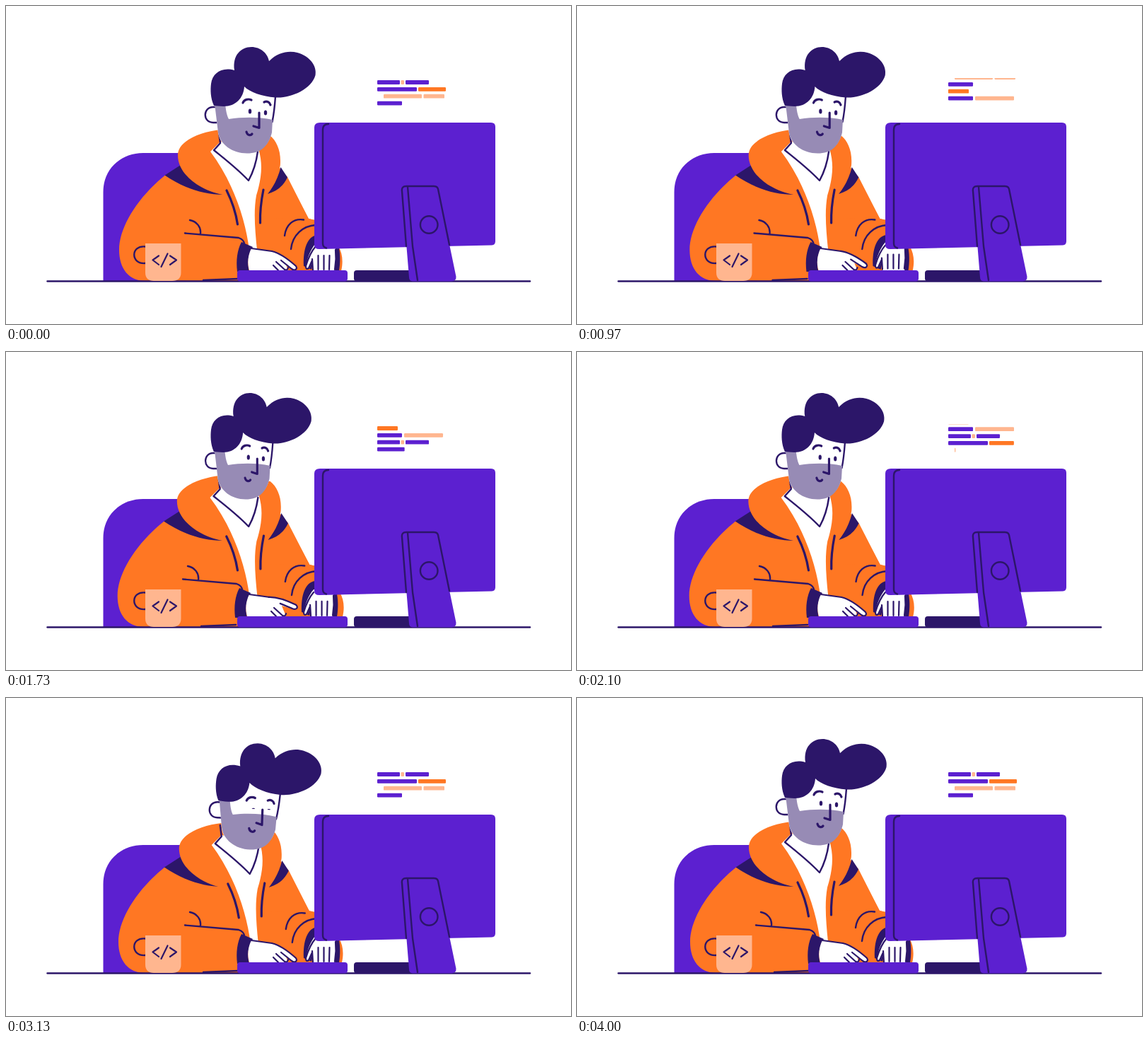
An HTML page that plays this animation: 799 by 450 pixels, repeating every 4030 ms.

```html
<!DOCTYPE html>
<html lang="en">
<head>
<meta charset="utf-8">
<title>Developer at work</title>
<style>
  html, body { margin: 0; width: 100%; height: 100%; overflow: hidden; background: #fff; }
  svg { display: block; width: 100vw; height: 100vh; }
  .purple { fill: #5c20d0; }
  .navy { fill: #2c1669; }
  .orange { fill: #ff7723; }
  .peach { fill: #ffb68f; }
  .beard { fill: #978bb5; }
  .white { fill: #fff; }
  .line { fill: none; stroke: #2c1669; stroke-width: 2.4; stroke-linecap: round; stroke-linejoin: round; }
  .bold { stroke-width: 3.2; }
  .fine { stroke-width: 2.2; }
</style>
</head>
<body>
<svg viewBox="0 0 799 450" preserveAspectRatio="none">
  <defs><clipPath id="window"><rect x="515" y="102" width="120" height="41"/></clipPath></defs>

  <path class="purple" d="M137.500 389V263C137.500 231 162 208 194 208H255V389Z"/>

  <g id="body">
    <path class="orange" d="M248 226L225 239.500C186 271 160 313 160 345C160 372 174 389 197 389H332V375H474C477 362 476 350 470 340L437 303L428 301L396 241L380 226Z"/>
    <path class="navy" d="M247 225L224.500 239.500C250 257 278 267 307 267C285 260 264 246 247 225Z"/>
  </g>

  <g id="hood">
    <path class="orange" d="M303 175C275 178 243 191 243 211C243 240 277 262 307 267L370 300L437 303L428 301L398 242L387 229C388 226 388 223 388 219C388 203 382 190 373 183Z"/>
    <path class="navy" d="M388.500 228L398 242.500C392 255 383 262 370 266C378 256 385 243 388.500 228Z"/>
    <path class="white" d="M289 206L303 192L357 202C364 225 361 245 354 268C350 290 352 316 355 345H344C339 304 322 250 289 206Z"/>
    <path class="line" d="M301 178L303 194L294 204C310 217 327 230 343 247C349 236 354 221 356 206"/>
    <path class="line bold" d="M312 261C319 275 325 292 327.500 309M364 260C361 275 359 290 359.500 307"/>
    <path class="line" d="M394 325C396 310 406 300 421 302.500M403 344C405 324 420 311 438 310"/>
  </g>

  <g id="head">
    <path class="line" style="fill:#fff" d="M298 143H293C278 143 278 165 293 165H299"/>
    <path class="white" d="M295 136L300 180C304 200 322 208 341 208C360 208 373 195 376 178L381 126Z"/>
    <path class="line" d="M381 128C380 142 379 152 376.500 164"/>
    <path class="beard" d="M295 138H310C311 148 312 154 315 160C335 157 358 157 377 161L376 179C371 199 360 208.500 341 208.500C320 208.500 303 196 300 179Z"/>
    <path class="navy" d="M294 141C289 130 289 118 290 110C292 95 305 86 323 91C320 70 332 58 347 58C360 58 370 67 372 78C385 65 400 63 412 66C430 71 440 85 437.500 98C432 118 402 131 381 129.500C362 128 345 122 337 114C336 130 325 142 308 142C302 142 297 141 294 141Z"/>
    <g id="face">
      <path id="brows" class="line bold" d="M335 137C337 132 343 131 347 133M365 136C369 134 373 136 374 140"/>
      <g id="eyes" class="navy">
        <ellipse cx="345" cy="149" rx="2.200" ry="3.500"/>
        <ellipse cx="367" cy="151" rx="2.200" ry="3.500"/>
      </g>
      <path class="line bold" d="M358 151V172.500L350 170M340 178C341 183 346 184 348 181"/>
    </g>
  </g>

  <g id="armL">
    <path class="line" d="M260 303C270 305 276 313 275 322M253 321.500L329 328Q337 331 337 337M279 388L328 386"/>
    <path class="navy" d="M333 334L349 341C342 352 341 364 344 376H327C325 360 327 345 333 334Z"/>
    <path class="white" d="M347 343L377 347L392 357L399 374H344C341 364 342 353 347 343Z"/>
    <g id="fingerL">
      <path class="white" d="M368 347L377 347C390 352 400 359 410 369C411 373 407 374 404 372L384 360Z"/>
      <path class="line fine" d="M376 347C389 350 401 360 410 368C413 373 408 375 404 372L389 360"/>
    </g>
    <path class="line fine" d="M347 343L376 347M382 362L394 373Q398 375 399 370M378 367L385 374"/>
  </g>

  <g id="armR">
    <path class="navy" d="M440 324C426 326 420 344 421 368L432 373L439 342ZM462 338H470C473 350 473 362 471 375H463Z"/>
    <g id="handR">
      <path class="white" d="M438 336H465L467 356L465 378H434L433 362L429 371Q424 374 424 368C427 354 431 344 438 336Z"/>
      <path class="line fine" d="M438 340C431 348 427 358 424 368Q424 374 428 371L433 360M433 358L434 374M441.500 353V373M449.500 353V373M457.500 353L457 373M466 345L466.500 358L465 373"/>
    </g>
  </g>

  <path class="line" d="M58.500 389.500H741"/>
  <rect class="purple" x="327" y="374" width="156" height="15.500" rx="4"/>
  <rect class="navy" x="492" y="374" width="90" height="15.500" rx="4"/>

  <path class="line" d="M197 340.500C176 338 176 366 197 364"/>
  <path class="peach" d="M197 336H247.500V377Q247.500 389 235 389H209Q197 389 197 377Z"/>
  <path class="line fine" d="M216 353.500L207.500 359.500L216 366M228.500 350.500L219.500 369M232 353.500L241 359.500L232 366"/>

  <path class="purple" d="M444 165H686Q692 165 692 171V333Q692 338 687 338.500L443 344Q436 344 436 338V172Q436 165 444 165Z"/>
  <path class="line" d="M456 167Q448 167 448 175V336Q448 341 453 342.500"/>
  <path class="purple" d="M560 262Q560 255 566 255H605Q610 255 611 260L636.500 383Q637 389 630 389.500H575Q570 389 570 384Z"/>
  <path class="line" d="M566 340L560 262Q559 255 566 255H605Q610 255 611 259L627 338M568 256L575 340L582 388"/>
  <circle class="line" cx="598.200" cy="309.500" r="12.300"/>

  <g id="code" clip-path="url(#window)"></g>
</svg>

<script>
const LOOP = 4030, STEP = 100 / 3, ROW = 9.85;
const el = id => document.getElementById(id);
const svgEl = (name, parent) =>
  parent.appendChild(document.createElementNS('http://www.w3.org/2000/svg', name));

// Each bar: colour, left, right. The six lines repeat.
const LINES = [
  [['purple', 525, 557], ['peach', 558.5, 563], ['purple', 565, 598]],
  [['purple', 525, 581], ['orange', 583, 622]],
  [['peach', 534, 588], ['peach', 590.5, 620]],
  [['purple', 525, 560]],
  [['orange', 525, 554]],
  [['purple', 525, 560], ['peach', 563, 618]]
];
// Start and end of typing for lines 4 to 9.
const TYPED = [[0, 200], [200, 860], [970, 1472], [1472, 2128], [2090, 2740], [2740, 3010]];
const SCROLL = [[0, 0], [180, 1], [230, 1], [420, 2], [860, 2], [1010, 3], [1260, 3],
  [1330, 3.2], [1530, 4], [1880, 4], [2100, 4.88], [2150, 5], [2630, 5], [2700, 5.33], [2840, 6]];
const ARM_X = [[0, 0], [570, -2], [1330, -3], [1600, -3.3], [2100, -2], [2680, 0]];
const TAPS_L = [150, 360, 570, 800, 1030, 1540, 1760, 1960, 2260, 2460, 2930];
const TAPS_R = [250, 465, 690, 920, 1180, 1640, 1860, 2210, 2370, 2560, 2840];

const clamp = v => Math.max(0, Math.min(1, v));
const bump = (t, from, to) => Math.sin(Math.PI * clamp((t - from) / (to - from))) ** 2;
const taps = (times, t) => Math.max(...times.map(c => bump(t, c - 100, c + 100)));

function track(keys, t) {
  const i = keys.findIndex(k => k[0] > t);
  if (i < 0) return keys[keys.length - 1][1];
  const [t0, a] = keys[i - 1], [t1, b] = keys[i];
  return a + (b - a) * (t - t0) / (t1 - t0);
}

const rows = Array.from({ length: 10 }, (_, i) => {
  const g = svgEl('g', el('code'));
  const bars = LINES[i % 6].map(([color, left, right]) => {
    const rect = svgEl('rect', g);
    const attrs = { class: color, x: left, y: -2.9, height: 5.8, rx: 1.2 };
    for (const [k, v] of Object.entries(attrs)) rect.setAttribute(k, v);
    return { rect, left, right };
  });
  return { g, bars };
});

function drawCode(t) {
  const scroll = track(SCROLL, t);
  rows.forEach(({ g, bars }, i) => {
    g.setAttribute('transform', `translate(0 ${108 + (i - scroll) * ROW})`);
    const [start, end] = i < 4 ? [-1, 0] : TYPED[i - 4];
    const x0 = bars[0].left, x1 = bars[bars.length - 1].right;
    const caret = x0 + (x1 - x0) * clamp((t - start) / (end - start));
    for (const b of bars) b.rect.setAttribute('width', Math.max(0, Math.min(b.right, caret) - b.left));
  });
}

const move = (id, transform) => el(id).setAttribute('transform', transform);
const about = (x, y, transform) => `translate(${x} ${y}) ${transform} translate(${-x} ${-y})`;

function draw(t) {
  const turn = bump(t, 600, 2650);
  const nod = bump(t, 2860, 3430) + bump(t, 3430, 4000);
  const blink = bump(t, 3030, 3240);
  const armX = track(ARM_X, t);

  move('body', about(330, 0, `scale(${1 + 0.014 * turn + 0.006 * nod} 1)`));
  move('hood', `translate(${1.8 * nod} ${2 * nod}) ` + about(330, 0, `scale(${1 + 0.014 * turn} 1)`));
  move('head', `translate(${4 * nod} ${6 * nod}) rotate(${2.1 * nod} 341 208) ` +
    about(290, 0, `scale(${1 - 0.041 * turn} 1)`));
  move('face', `translate(${-1.3 * nod} ${0.5 * nod})`);
  move('brows', `translate(0 ${1.8 * nod})`);
  move('eyes', about(356, 150, `scale(1 ${1 - 0.8 * clamp(blink * 1.5)})`));
  move('armL', `translate(${armX} 0)`);
  move('armR', `translate(${armX} 0)`);
  move('fingerL', `rotate(${-19 * taps(TAPS_L, t)} 375 352)`);
  move('handR', `translate(${0.8 * taps(TAPS_R, t)} ${-2.5 * taps(TAPS_R, t)})`);
  drawCode(t);
}

const begin = performance.now();
function tick() {
  const t = (performance.now() - begin) % LOOP;
  draw(Math.floor((t + 4) / STEP) * STEP);
  requestAnimationFrame(tick);
}
tick();
</script>
</body>
</html>
```
